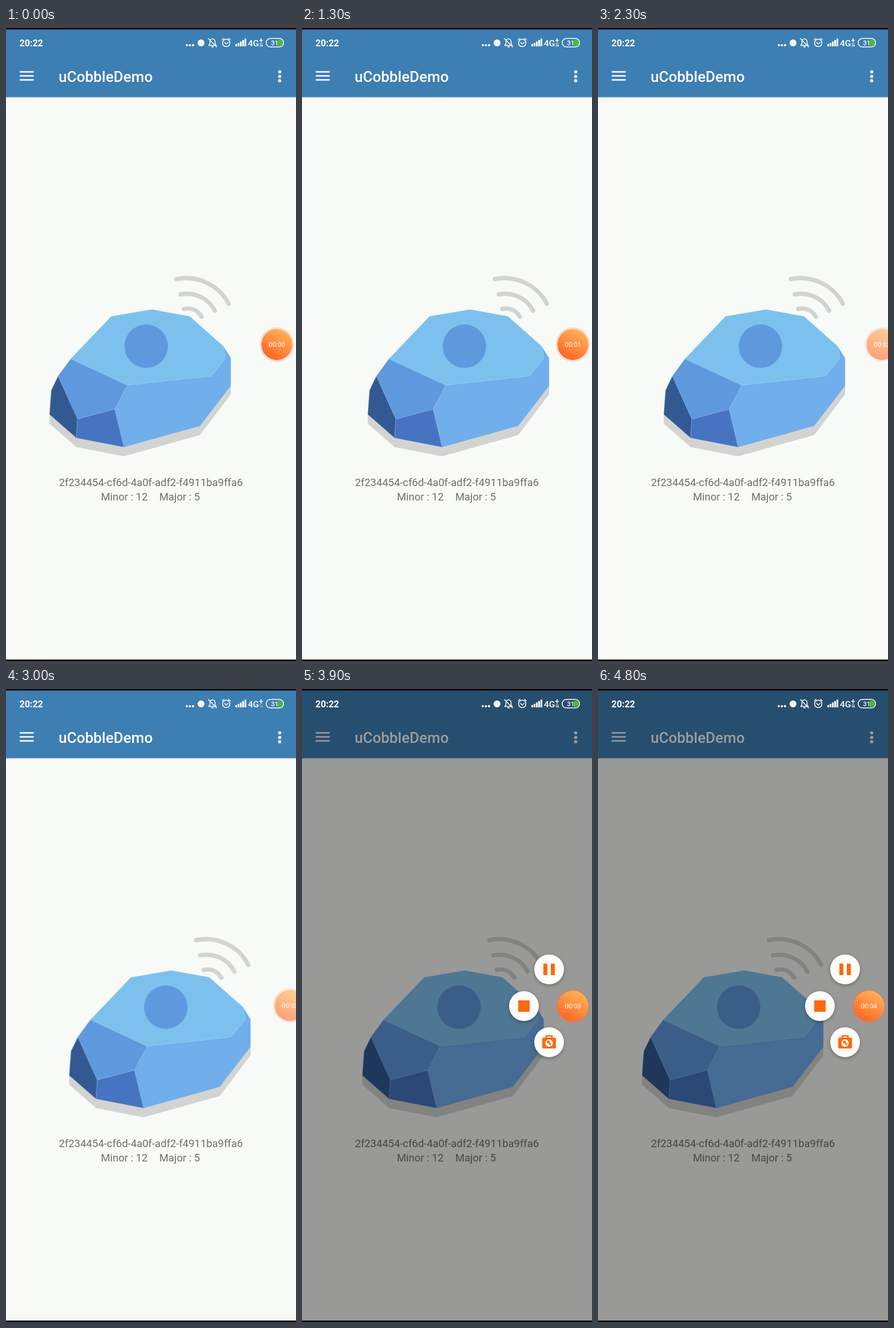
Write an HTML page that moves like this. It is 507 by 1104 pixels and loops after 4900 ms.

```html
<!DOCTYPE html>
<html lang="en">
<head>
<meta charset="utf-8">
<title>Beacon screen</title>
<style>
html, body { margin: 0; width: 100%; height: 100%; overflow: hidden; background: #f8faf7; }
svg { display: block; }
#stage { width: 507px; height: 1104px; font-family: Roboto, sans-serif; }
.beacon, .arrow, .bubble, .digits, .shade, .button { animation: 4.9s linear infinite; }

.beacon { animation-name: sway; }
.face { stroke: #9cc6ee; stroke-opacity: .35; stroke-width: 1; stroke-linejoin: round; }
.waves { fill: none; stroke: #d3d4d1; stroke-width: 7.5; stroke-linecap: round; }
.info { font-size: 18.4px; fill: #6f706e; }
.icon { fill: none; stroke: #fff; stroke-width: 1.5; stroke-linecap: round; stroke-linejoin: round; }
.arrow { animation-name: flicker; animation-timing-function: step-end; }
.bubble { animation-name: tuck; }
.digits { animation-name: count; animation-timing-function: step-end; }
.shade { animation-name: dim; }
.button { animation-name: pop; filter: drop-shadow(0 2px 3px rgba(0, 0, 0, .3)); }

@keyframes sway {
  0%, 100% { transform: translateX(0); }
  10.2% { transform: translateX(23px); }
  26.53% { transform: translateX(39px); }
  46.94% { transform: translateX(39px); }
  61.22% { transform: translateX(34.5px); }
  79.59% { transform: translateX(29.5px); }
  97.96% { transform: translateX(1px); }
}
@keyframes flicker {
  0%, 65% { opacity: 1; }
  55% { opacity: .4; }
}
@keyframes tuck {
  0%, 30.6% { transform: none; opacity: 1; }
  34.7%, 72.4% { transform: translateX(23px); opacity: .6; }
  74.5%, 100% { transform: translateY(1px); opacity: 1; }
}
@keyframes count {
  0% { transform: translateY(0); }
  22.45% { transform: translateY(-20px); }
  42.86% { transform: translateY(-40px); }
  63.27% { transform: translateY(-60px); }
  83.67% { transform: translateY(-80px); }
}
@keyframes dim {
  0%, 74.5% { opacity: 0; }
  77.5%, 100% { opacity: .385; }
}
@keyframes pop {
  0%, 74.5% { transform: translate(473px, 553px) scale(0); }
  78.6%, 100% { transform: translate(var(--x), var(--y)); }
}
</style>
</head>
<body>
<svg id="stage" viewBox="0 0 507 1104">
  <defs>
    <linearGradient id="orange" x1=".8" y1="0" x2=".25" y2="1">
      <stop offset="0" stop-color="#ffb75c"/>
      <stop offset="1" stop-color="#ff6221"/>
    </linearGradient>
  </defs>

  <rect width="507" height="1104" fill="#f8faf7"/>
  <rect y="120" width="507" height="2" fill="#d5e0e6"/>
  <rect width="507" height="120.5" fill="#3d7eb3"/>

  <g fill="#fff">
    <path d="M24 76.5h24.500M24 83.500h24.500M24 90.500h24.500" stroke="#fff" stroke-width="2.300"/>
    <text x="92" y="94" font-size="26" font-weight="500">uCobbleDemo</text>
    <circle cx="478.500" cy="76.500" r="2.800"/>
    <circle cx="478.500" cy="84.500" r="2.800"/>
    <circle cx="478.500" cy="92" r="2.800"/>
  </g>

  <g class="beacon">
    <g class="waves">
      <path d="M298 438C330 431 371 445 389 481"/>
      <path d="M305 464.500C328 460 353 470 365 493"/>
      <path d="M311 490C324 487 335 492 342 503.500"/>
    </g>
    <path fill="#d3d4d1" d="M76 670V690L123 731 206 747 339 710 393 639V615Z"/>
    <g class="face">
      <path fill="#70aeec" d="M212 623 359 607 384 576 380 555 393 576V624L339 694 206 731 190 665Z"/>
      <path fill="#7cc1ee" d="M184 503 255 491 321 503 380 555 384 576 359 607 212 623 113 577Z"/>
      <path fill="#5f99dd" d="M113 577 212 623 190 665 125 682 91 607Z"/>
      <path fill="#335993" d="M91 607 125 682 123 715 76 674 79 632Z"/>
      <path fill="#4674c1" d="M125 682 190 665 206 731 123 715Z"/>
    </g>
    <circle cx="245" cy="555" r="38" fill="#5f99dd"/>
  </g>

  <g class="info">
    <text x="92.500" y="799">2f234454-cf6d-4a0f-adf2-f4911ba9ffa6</text>
    <text x="166" y="824">Minor : 12</text>
    <text x="268" y="824">Major : 5</text>
  </g>

  <rect class="shade" width="507" height="1104"/>

  <g fill="#fff">
    <text x="23.500" y="31.500" font-size="16" font-weight="700">20:22</text>
    <circle cx="316" cy="30" r="2"/>
    <circle cx="321.500" cy="30" r="2"/>
    <circle cx="327" cy="30" r="2"/>
    <circle cx="341" cy="26" r="6"/>
    <g class="icon">
      <path d="M354.500 30.500H367.500L365.500 27.500V23.500A4.500 4.500 0 0 0 356.500 23.500V27.500ZM359.500 33h3M354 18.500 368 33"/>
      <circle cx="385" cy="26" r="6.500"/>
      <path d="M382 25 385 28 388.500 25M378 20.500 381 18M392 20.500 389 18"/>
    </g>
    <path d="M401 28h3v4h-3zM405 26h3v6h-3zM409 23.500h3v8.500h-3zM413 21h3v11h-3zM417 18.500h3v13.500h-3z"/>
    <text x="423" y="31.500" font-size="15.500" font-weight="500">4G</text>
    <path class="icon" stroke-width="1.300" d="M446 18.500V25M443.500 21.500h5"/>
    <path class="arrow icon" style="stroke-width:1" d="M444.500 27V32M447.500 27V32M446.300 30.500 447.500 32 448.700 30.500"/>
    <path fill="#43c41c" d="M475 20.500h3.500a5 5 0 0 1 0 10.500H475z"/>
    <rect class="icon" x="454.800" y="18.300" width="30.400" height="14.800" rx="7.400"/>
    <text x="469.800" y="30" font-size="11.500" font-weight="500" text-anchor="middle">31</text>
  </g>

  <g fill="#fd6a10">
    <g class="button" style="--x:432px;--y:489px">
      <circle r="26" fill="#fdfdfc"/>
      <path d="M-10-10h7v20h-7zM3-10h7v20H3z"/>
    </g>
    <g class="button" style="--x:388px;--y:553px">
      <circle r="26" fill="#fdfdfc"/>
      <rect x="-10" y="-10" width="20" height="20" rx="1"/>
    </g>
    <g class="button" style="--x:432px;--y:616px">
      <circle r="26" fill="#fdfdfc"/>
      <path d="M-5-7V-11H5V-7" fill="none" stroke="#fd6a10" stroke-width="2.500"/>
      <rect x="-12" y="-8" width="24" height="19" rx="2"/>
      <circle cy="1.500" r="6.500" fill="#fff"/>
      <path d="M-1 0 3.500 4.500" stroke="#fd6a10" stroke-width="2.500"/>
      <circle cx="-1.500" cy="-.5" r="2.500"/>
    </g>
  </g>

  <g class="bubble">
    <circle cx="473.500" cy="552" r="30" fill="#ff7043" opacity=".22"/>
    <circle cx="473.500" cy="552" r="27" fill="url(#orange)"/>
    <svg x="453" y="542" width="41" height="20" overflow="hidden">
      <g class="digits" fill="#fff" font-size="11.500" text-anchor="middle">
        <text x="20.500" y="14">00:00</text>
        <text x="20.500" y="34">00:01</text>
        <text x="20.500" y="54">00:02</text>
        <text x="20.500" y="74">00:03</text>
        <text x="20.500" y="94">00:04</text>
      </g>
    </svg>
  </g>

  <path d="M0 0H507V2.500H0zM0 1101.500H507V1104H0z"/>
</svg>
</body>
</html>
```
